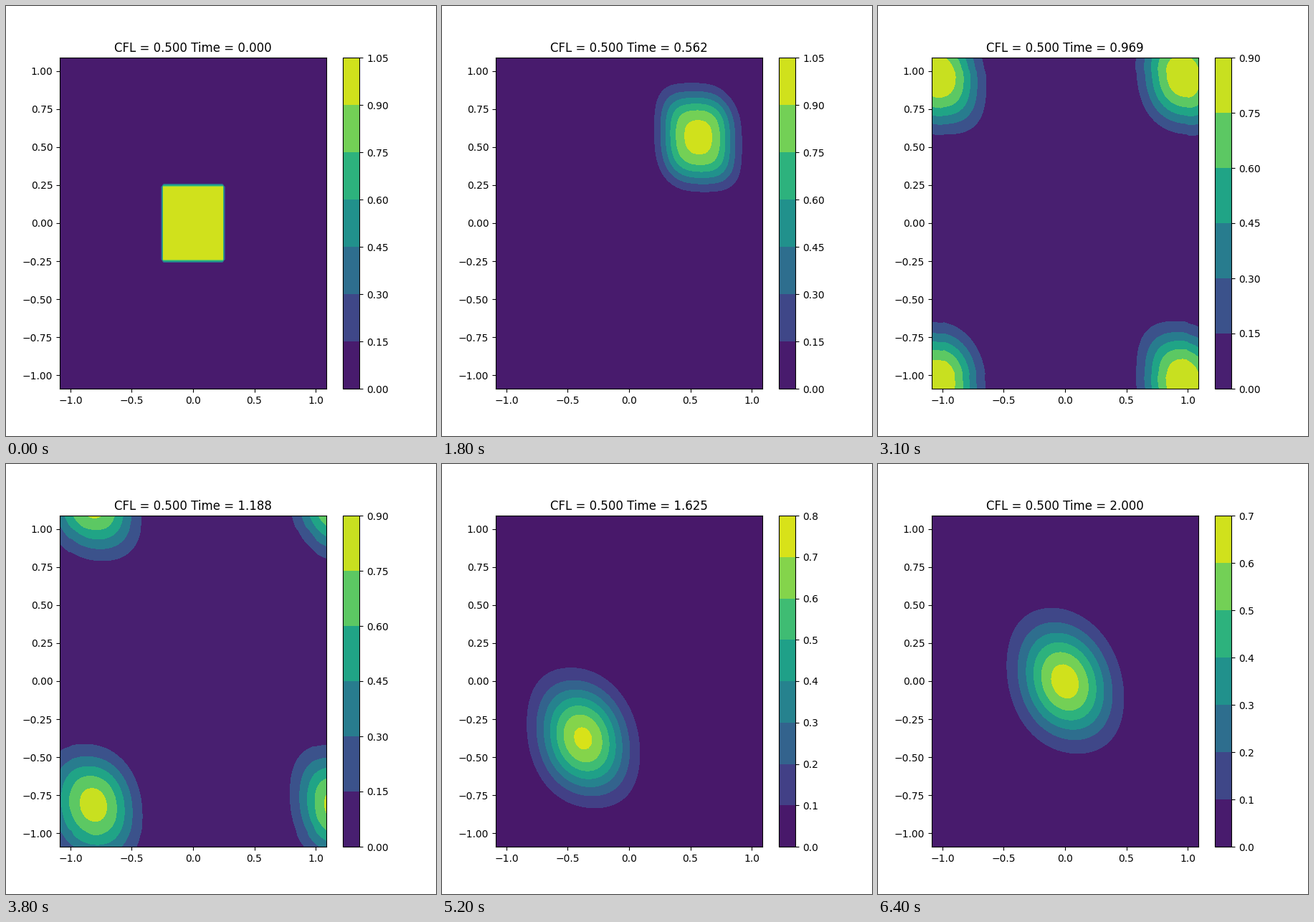
Write a matplotlib script that moves like this. It is 600x600 px and loops after 6500 ms.

```python
"""Upwind advection of a square pulse across a periodic box."""
import numpy as np
import matplotlib.pyplot as plt
from matplotlib.animation import FuncAnimation

N = 80                      # interior cells per side
GHOST = 4                   # ghost cells on each side
DX = 2.0 / N
CFL = 0.5
DT = CFL * DX / 2           # unit speed along both axes
STEPS_PER_FRAME = 5
FRAMES = 65
FRAME_TIME = 1 / 32

centers = -1 + (np.arange(-GHOST, N + GHOST) + 0.5) * DX
X, Y = np.meshgrid(centers, centers)
inside = slice(GHOST, GHOST + N)


def fill_ghosts(q):
    return np.pad(q[inside, inside], GHOST, mode="wrap")


def step(q):
    """One donor-cell step; the ghost cells keep their old values."""
    q = fill_ghosts(q)
    c = DT / DX
    left = np.roll(q, 1, axis=1)
    below = np.roll(q, 1, axis=0)
    moved = q - c * (q - left) - c * (q - below)
    q[inside, inside] = moved[inside, inside]
    return q


def solve():
    q = np.where((abs(X) < 0.25) & (abs(Y) < 0.25), 1.0, 0.0)
    states = [q]
    for _ in range(FRAMES - 1):
        for _ in range(STEPS_PER_FRAME):
            q = step(q)
        states.append(q)
    return states


states = solve()
fig = plt.figure(figsize=(6, 6), dpi=100)


def draw(i):
    fig.clf()
    ax = fig.add_subplot()
    filled = ax.contourf(X, Y, states[i])
    fig.colorbar(filled, ax=ax)
    ax.set_title(f"CFL = {CFL:.3f} Time = {i * FRAME_TIME:.3f}")
    return []


anim = FuncAnimation(fig, draw, frames=FRAMES, init_func=lambda: [],
                     interval=100, repeat=True, repeat_delay=0)
plt.show()
```
